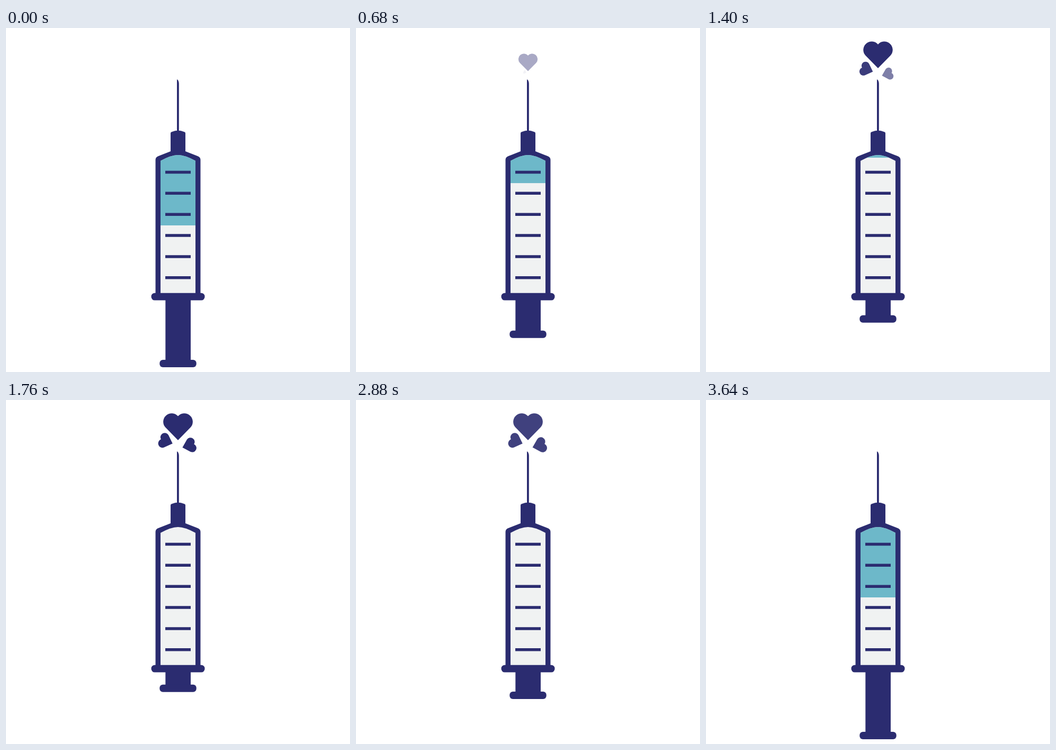
Animation of 650x650 px, one loop 3840 ms. Source, as an HTML page:

```html
<!DOCTYPE html>
<html lang="en">
<head>
<meta charset="utf-8">
<title>Syringe with hearts</title>
<style>
html, body { margin: 0; width: 100%; height: 100%; overflow: hidden; background: #fff; }
svg { display: block; width: 650px; height: 650px; }
</style>
</head>
<body>
<svg viewBox="0 0 650 650" fill="#2b2c70">
  <defs>
    <path id="heart" d="M0 0L-23.9-24.4A15.8 15.8 0 1 1 0-45.4A15.8 15.8 0 1 1 23.9-24.4Z"/>
    <path id="cavity" d="M292 501V251Q312 240 325 240T358 251V501Z"/>
    <clipPath id="inside"><use href="#cavity"/></clipPath>
  </defs>
  <g id="hearts"></g>
  <g id="plunger">
    <rect x="301.3" y="505" width="47.7" height="130"/>
    <rect x="290.3" y="627" width="69.4" height="14" rx="6"/>
  </g>
  <path d="M323 97Q326.8 99 326.8 106V196H323Z"/>
  <path d="M282.5 505V249Q282.5 244 288 242L311 233V199Q311 196.5 314 196Q325 191.5 336 196Q339 196.5 339 199V233L362 242Q367.5 244 367.5 249V505Z"/>
  <use href="#cavity" fill="#f0f2f2"/>
  <rect id="fluid" x="290" y="236" width="70" fill="#6db8c9" clip-path="url(#inside)"/>
  <path d="M301 272.5h48m-48 39.85h48m-48 39.85h48m-48 39.85h48m-48 39.85h48m-48 39.85h48" stroke="#2b2c70" stroke-width="5.5"/>
  <rect x="274.5" y="500.7" width="101" height="13.9" rx="6.5"/>
</svg>
<script>
const LOOP = 3840;
const el = id => document.getElementById(id);
const ramp = (t, from, to) => Math.min(1, Math.max(0, (t - from) / (to - from)));

// Cubic Bezier easing with control heights 0 and 1
function ease(x, x1, x2) {
  let lo = 0, hi = 1, s;
  for (let i = 0; i < 24; i++) {
    s = (lo + hi) / 2;
    const at = 3 * s * (1 - s) * ((1 - s) * x1 + s * x2) + s ** 3;
    if (at < x) lo = s; else hi = s;
  }
  return s * s * (3 - 2 * s);
}

// Each heart grows away from an origin near the needle tip
const hearts = [
  { start: 315, origin: [325, 92], tip: [325, 76], angle: 0, size: 1 },
  { start: 600, origin: [324, 85], tip: [314.7, 82.3], angle: -70, size: 0.515 },
  { start: 865, origin: [328, 92], tip: [333.6, 89.6], angle: 74, size: 0.52 }
].map(heart => {
  const node = document.createElementNS("http://www.w3.org/2000/svg", "use");
  node.setAttribute("href", "#heart");
  el("hearts").append(node);
  return { ...heart, node };
});

function draw(t) {
  const push = ramp(t, 180, 2000);
  const back = ease(ramp(t, 2680, 3640), 0.2, 0.78);
  const lift = 90 * ease(push, 0, 0.2) * (1 - back);
  el("plunger").setAttribute("transform", `translate(0 ${-lift})`);

  const refill = t > 2680;
  const level = refill ? 373 : 373 - 137 * ease(push, 0.065, 0.2);
  el("fluid").setAttribute("height", Math.max(0, level - 236));
  el("fluid").setAttribute("opacity", refill ? ramp(t, 2950, 3640) : 1);

  const fade = 1 - ramp(t, 2834, 3290);
  for (const { node, start, origin: [ox, oy], tip: [x, y], angle, size } of hearts) {
    const grow = ease(ramp(t, start, start + 1200), 0, 0.2);
    node.setAttribute("transform",
      `translate(${ox} ${oy}) scale(${grow}) translate(${x - ox} ${y - oy}) rotate(${angle}) scale(${size})`);
    node.setAttribute("opacity", ramp(t, start + 30, start + 865) * fade);
  }
}

const begin = performance.now();
function tick() {
  draw((performance.now() - begin) % LOOP);
  requestAnimationFrame(tick);
}
tick();
</script>
</body>
</html>
```
